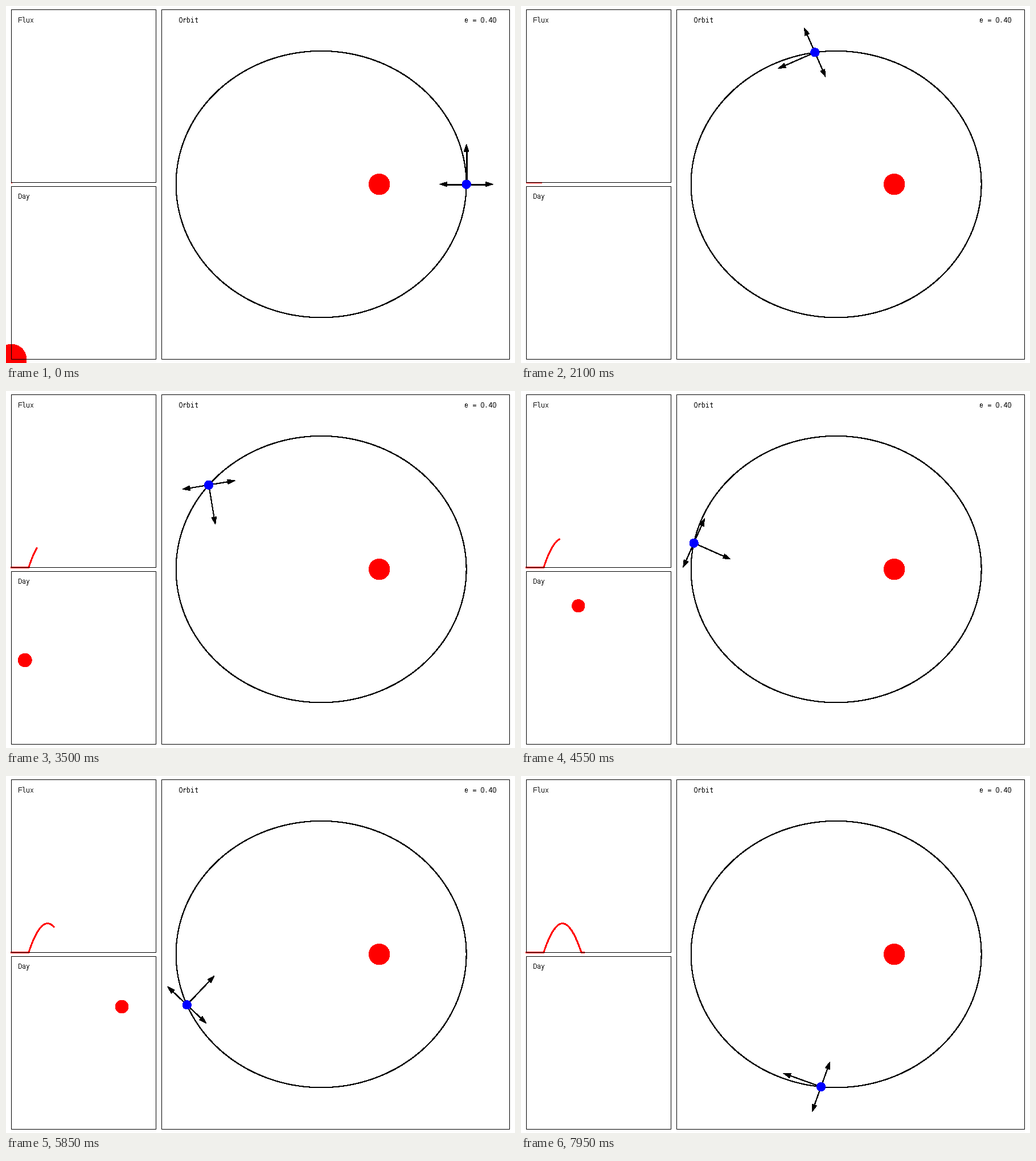
These frames come from a looping animation (894x626 px, 8000 ms). A matplotlib script:

```python
import numpy as np
import matplotlib.pyplot as plt
from matplotlib.animation import FuncAnimation
from matplotlib.patches import Circle, Polygon, Rectangle

W, H, DPI = 894, 626, 100
PX = 72 / DPI                      # points per pixel
FRAMES, STEP = 160, 50
GROW = 0.45                        # aliased fills spread by about this much
STROKE = 1.1 * PX                  # renders two pixels wide when aliased

ECC, A = 0.4, 255.0
STAR = np.array([655.6, 312.6])
MEAN_RATE = 0.03148                # radians per frame
SPIN = 1.5 * MEAN_RATE             # 3:2 spin-orbit resonance

LEFT, FLUX_BASE, DAY_BASE = 9.5, 309.6, 619.5
DAY_MID, DAY_HALF, DAY_TOP = 136.5, 127.0, 253.0
RED, BLUE = "#ff0000", "#0000ff"

plt.rcParams.update({
    "text.antialiased": False,
    "text.hinting": "native",
    "text.hinting_factor": 1,
    "toolbar": "None",
})


def eccentric_anomaly(mean):
    ecc = mean + ECC * np.sin(mean)
    for _ in range(12):
        ecc -= (ecc - ECC * np.sin(ecc) - mean) / (1 - ECC * np.cos(ecc))
    return ecc


def orbit_point(ecc):
    """Offset from the star, y pointing up."""
    return A * (np.cos(ecc) - ECC), A * np.sqrt(1 - ECC**2) * np.sin(ecc)


k = np.arange(FRAMES)
dx, dy = orbit_point(eccentric_anomaly(MEAN_RATE * k))
dist = np.hypot(dx, dy) / A
zenith = np.pi / 2 + SPIN * k
hour = np.arctan2(-dy, -dx) - zenith
height = np.cos(hour)
flux = 100 * np.clip(height, 0, None) / dist**2
flux_x = LEFT + 0.635 * k

fig = plt.figure(figsize=(W / DPI, H / DPI), dpi=DPI, facecolor="white")
ax = fig.add_axes([0, 0, 1, 1])
ax.set_xlim(0, W)
ax.set_ylim(H, 0)
ax.axis("off")


def disc(x, y, r, color, z):
    return ax.add_patch(Circle((x, y), r - GROW, fc=color, ec="none", lw=0,
                               antialiased=False, zorder=z))


def panel(x0, y0, x1, y1):
    ax.add_patch(Rectangle((x0, y0), x1 - x0, y1 - y0, fill=False, ec="black",
                           lw=PX, snap=False, zorder=6))


def label(x, baseline, text):
    ax.text(x, baseline, text, family="DejaVu Sans Mono", size=11.63 * PX,
            color="black", ha="left", va="baseline", zorder=7)


class Arrow:
    def __init__(self, turn, length):
        self.turn, self.length = turn, length
        self.shaft, = ax.plot([], [], color="black", lw=STROKE,
                              antialiased=False, zorder=3)
        self.head = ax.add_patch(Polygon(np.zeros((3, 2)), fc="black", lw=0,
                                         antialiased=False, zorder=3))

    def place(self, origin, angle):
        angle += self.turn
        along = np.array([np.cos(angle), -np.sin(angle)])
        side = np.array([along[1], -along[0]])
        tip = origin + self.length * along
        neck = tip - 13 * along
        self.shaft.set_data(*zip(origin, neck))
        self.head.set_xy([tip, neck + 4.2 * side, neck - 4.2 * side])


panel(LEFT, 6.5, 263.5, 309.5)
panel(LEFT, 316.5, 263.5, 619.5)
panel(273.5, 6.5, 884.5, 619.5)
label(21, 29, "Flux")
label(21, 338, "Day")
label(303, 29, "Orbit")
label(805, 29, "e = 0.40")

ox, oy = orbit_point(np.linspace(0, 2 * np.pi, 181))
ax.plot(STAR[0] + ox, STAR[1] - oy, color="black", lw=STROKE,
        antialiased=False, zorder=2)
disc(*STAR, 18.6, RED, 2)

planet = disc(0, 0, 8, BLUE, 4)
sun = disc(0, 0, 1, RED, 1)
arrows = [Arrow(0, 70.3), Arrow(np.pi / 2, 46.8), Arrow(-np.pi / 2, 46.8)]
curve, = ax.plot([], [], color=RED, lw=1.8 * PX, marker="s", ms=2.4 * PX,
                 mew=0, antialiased=False, zorder=5)


def draw(i):
    pos = STAR + np.array([dx[i], -dy[i]])
    planet.center = tuple(pos)
    for arrow in arrows:
        arrow.place(pos, zenith[i])

    sun.set_visible(bool(height[i] > -1e-9))
    sun.center = (DAY_MID - DAY_HALF * np.sin(hour[i]),
                  DAY_BASE - DAY_TOP * height[i])
    sun.set_radius(16 / dist[i] - GROW)

    curve.set_data(flux_x[:i + 1], FLUX_BASE - flux[:i + 1])
    return [planet, sun, curve]


anim = FuncAnimation(fig, draw, frames=FRAMES, interval=STEP,
                     init_func=lambda: draw(0), repeat=True, repeat_delay=0)
plt.show()
```
